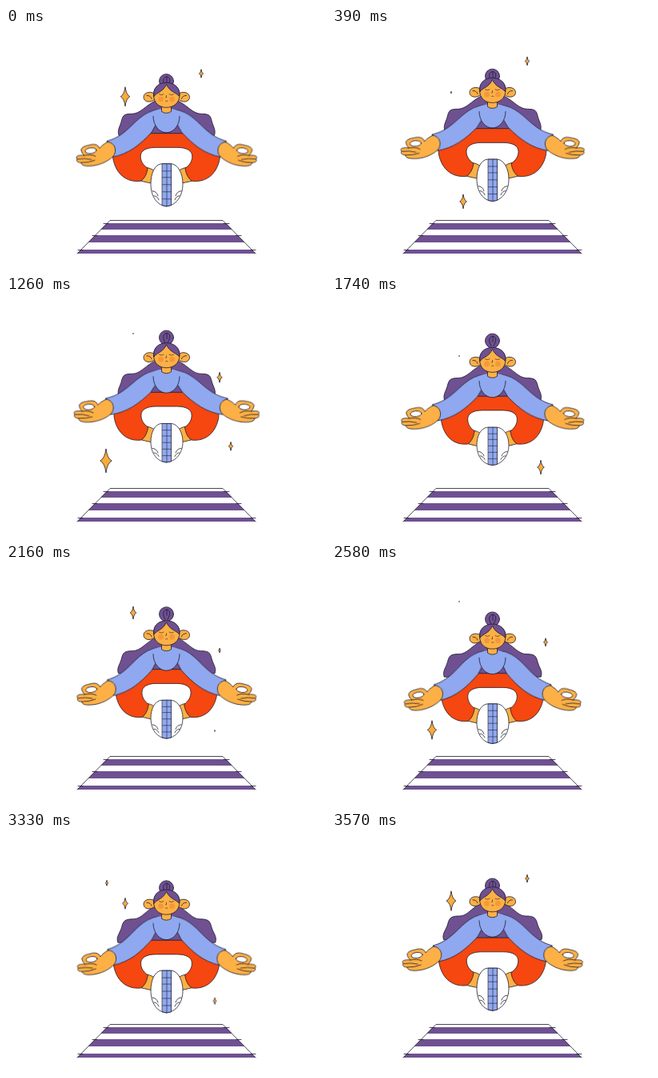
Recreate the animation shown at these times as an HTML page without scripts. Size 400 by 300 pixels, loop 3600 ms.

```html
<!DOCTYPE html>
<html lang="en">
<head>
<meta charset="utf-8">
<title>Floating meditation</title>
<style>
  html, body { margin: 0; width: 100%; height: 100%; overflow: hidden; background: #fff; }
  svg { display: block; width: 100vw; height: 100vh; }

  .ink { stroke: #1d1a2b; stroke-width: .8; stroke-linejoin: round; stroke-linecap: round; }
  .line { fill: none; }
  .fine { stroke-width: .6; }
  .purple { fill: #6f5192; }
  .blue { fill: #8fa8ef; }
  .red { fill: #f5470f; }
  .skin { fill: #fcb045; }
  .white { fill: #fff; }
  .cheek { fill: #f4983a; stroke: none; }

  /* Each part swings like a sine wave; --peak is when it is at its "from" pose. */
  .swing {
    animation: var(--move) 1.8s cubic-bezier(.364, 0, .636, 1) infinite alternate;
    animation-delay: calc((var(--peak) - 3600) * 1ms);
  }
  .upper { --move: bob; --peak: 1000; --high: -10.2px; --low: 7.8px; }
  .legs  { --move: bob; --peak: 1080; --high: -11.4px; --low: 6.6px; }
  .feet  { --move: bob; --peak: 1230; --high: -15.2px; --low: 4.2px; }
  .bun   { --move: bob; --peak: 1200; --high: -14.5px; --low: 4.9px; }
  .arm   { --move: lift; --peak: 1000; transform-origin: 186px 112px; }
  .knees { --move: narrow; --peak: 400; transform-origin: 200.7px 160px; }
  .shoe  { --move: squash; --peak: 0; transform-origin: 200.7px 223px; }

  @keyframes bob    { from { translate: 0 var(--high); } to { translate: 0 var(--low); } }
  @keyframes lift   { from { transform: rotate(3.9deg); } to { transform: rotate(-2.8deg); } }
  @keyframes narrow { from { scale: 1 1; } to { scale: .94 1; } }
  @keyframes squash { from { scale: 1 1; } to { scale: 1 .89; } }

  .hair { animation: flow 1.8s ease-in-out infinite; }
  @keyframes flow {
    0%, 100% { d: path("M201 80L186 91C174 97 168 107 157 107C147 107 146 109 144 117C142 124 139 127 141 134L201 134Z"); }
    43% { d: path("M201 80L186 88C176 91 170 103 161 103C150 103 147 105 145 113C143 121 136 126 139 134L201 134Z"); }
    70% { d: path("M201 80L186 89C180 95 176 95 168 96C158 98 159 107 155 113C152 118 146 116 140 117C134 118 134 126 139 134L201 134Z"); }
  }

  .star {
    fill: #fbab3c; stroke: #1d1a2b; stroke-width: .8;
    animation: twinkle 3.6s linear infinite;
    animation-delay: calc((var(--start) - 3600) * 1ms);
  }
  @keyframes twinkle {
    0% { translate: var(--x) calc(var(--y) + var(--rise)); scale: 0; }
    6.25% { translate: var(--x) calc(var(--y) + var(--rise) / 2); scale: calc(var(--size) * .62); }
    12.5% { translate: var(--x) var(--y); scale: var(--size); }
    18.75% { translate: var(--x) calc(var(--y) - var(--rise) / 2); scale: calc(var(--size) * .62); }
    25%, 100% { translate: var(--x) calc(var(--y) - var(--rise)); scale: 0; }
  }
</style>
</head>
<body>
<svg viewBox="0 0 400 300">
  <defs>
    <path id="star" d="M0 -.5Q.05 -.1 .24 0Q.05 .1 0 .5Q-.05 .1 -.24 0Q-.05 -.1 0 -.5Z" vector-effect="non-scaling-stroke"/>
    <clipPath id="mat"><path d="M130 240H271L312 282H89Z"/></clipPath>

    <path id="hair" class="hair ink purple" d="M201 80L186 91C174 97 168 107 157 107C147 107 146 109 144 117C142 124 139 127 141 134L201 134Z"/>

    <g id="arm" class="ink">
      <path class="blue" d="M190 102C172 103 160 120 150 128C142 135 134 139 126 141L133 161C154 157 168 145 182 130L187 121"/>
      <path class="skin" d="M127 142C122 145 119 147 117 150C115 145 110 144 104 146C97 147 93 150 94 153Q95 157 98 159C90 158 86 160 89 163.500C87 166 90 168 94 168C94 172 100 172.500 107 172C118 171 128 166 134 160C139 154 137 143 127 142Z"/>
      <ellipse class="white" cx="106" cy="153" rx="7" ry="3.500" transform="rotate(-6 106 153)"/>
      <path class="line" d="M98 159Q106 157 112 160M89 163.500Q99 162 107 164M94 168Q104 168 111 165"/>
    </g>

    <g id="ear" class="ink">
      <path class="skin" d="M186 82C181 78 172 80 172 86C172 92 180 94 186 89Z"/>
      <path class="line" d="M176 84Q181 84 182 88"/>
    </g>
  </defs>

  <g class="ink">
    <path class="purple" clip-path="url(#mat)" stroke="none" d="M80 244H320V252H80ZM80 259H320V268H80ZM80 277H320V282H80Z"/>
    <path class="line" d="M89 282L130 240.500H271L312 282"/>
    <path class="line" d="M122 244.500H128M272 244.500H279M108 259.500H114M288 259.500H294M90 277.500H96M306 277.500H312"/>
  </g>

  <g class="swing upper">
    <use href="#hair"/>
    <use href="#hair" transform="matrix(-1 0 0 1 401.500 0)"/>
  </g>

  <g class="swing legs">
    <g class="swing knees ink">
      <path class="skin" d="M174 174C180 174 186 178 190 182L187 194C180 194 174 192 169 191ZM227 174C221 174 215 178 211 182L214 194C221 194 227 192 232 191Z"/>
      <path class="red" d="M150 131.500C136 140 131 156 134 166C138 182 150 193 168 191Q175 187 177 175C171 171 168 166 168 160C168 153 175 149 187 149H214C226 149 233 153 233 160C233 166 230 171 224 175Q226 187 233 191C251 193 263 182 267 166C270 156 265 140 251 131.500Z"/>
    </g>
  </g>

  <g class="swing feet">
    <g class="swing shoe ink">
      <path class="white" d="M200.500 223C189 222.500 181 211 181 195C181 182 186 171 194 170H207C215 171 221 182 221 195C221 211 212 222.500 200.500 223Z"/>
      <path class="blue" d="M195.500 170H206.500V222L200.500 223L195.500 222Z"/>
      <path class="line fine" d="M201 170V223M195.500 179H206.500M195.500 187H206.500M195.500 196H206.500M195.500 205H206.500M195.500 214H206.500"/>
      <path class="line" d="M183 204Q188 204 190 210M185 210Q189 210 191 215M219 204Q214 204 212 210M217 210Q213 210 211 215"/>
    </g>
  </g>

  <g class="swing upper">
    <g class="swing arm"><use href="#arm"/></g>
    <g transform="matrix(-1 0 0 1 401.500 0)">
      <g class="swing arm"><use href="#arm"/></g>
    </g>
    <path class="blue" d="M182 105Q189 101 195 101H206Q212 101 219 105L217 112C217 122 209 130.500 200.500 130.500C192 130.500 184 122 184 112Z"/>
    <path class="ink line" d="M184 110C184 122 192 130.500 200.500 130.500C209 130.500 217 122 217 110"/>
    <path class="ink skin" d="M194.500 94V104Q200.500 108 206.500 104V94Z"/>
  </g>

  <g class="swing bun ink">
    <circle class="purple" cx="200.500" cy="66.500" r="9"/>
    <path class="line" d="M199 73C194 65 198 60 202 61C207 63 204 69 202 73M201 61V68"/>
  </g>

  <g class="swing upper ink">
    <use href="#ear"/>
    <use href="#ear" transform="matrix(-1 0 0 1 401.500 0)"/>
    <path class="skin" d="M184.500 83C184.500 74 191 69 200.500 69S217 74 217 83C217 94 209 99 200.500 99S184.500 94 184.500 83Z"/>
    <path class="purple" d="M185 85C183 75 190 68 200.500 68S218.500 75 216.500 85C212 80 204 79 200.500 70C197 79 189 80 185 85Z"/>
    <circle class="cheek" cx="193.500" cy="88.500" r="3.400"/>
    <circle class="cheek" cx="207.500" cy="88.500" r="3.400"/>
    <path class="line fine" d="M191.500 82.500Q194 84.500 197 82.500M204 82.500Q207 84.500 209.500 82.500M200.500 84V86.500H199.500M199.500 91Q200.500 90 202 91"/>
  </g>

  <g>
    <use href="#star" class="star" style="--x:149px;--y:86px;--size:25;--rise:6px;--start:3130"/>
    <use href="#star" class="star" style="--x:244px;--y:49px;--size:16;--rise:18px;--start:3350"/>
    <use href="#star" class="star" style="--x:164px;--y:215px;--size:20;--rise:14px;--start:0"/>
    <use href="#star" class="star" style="--x:159px;--y:61px;--size:16;--rise:15px;--start:390"/>
    <use href="#star" class="star" style="--x:159px;--y:61px;--size:16;--rise:15px;--start:1710"/>
    <use href="#star" class="star" style="--x:281px;--y:194px;--size:18;--rise:12px;--start:580"/>
    <use href="#star" class="star" style="--x:125px;--y:206px;--size:30;--rise:5px;--start:810"/>
    <use href="#star" class="star" style="--x:125px;--y:206px;--size:30;--rise:5px;--start:2260"/>
    <use href="#star" class="star" style="--x:267px;--y:102px;--size:13;--rise:11px;--start:800"/>
    <use href="#star" class="star" style="--x:267px;--y:101px;--size:13;--rise:11px;--start:2000"/>
    <use href="#star" class="star" style="--x:261px;--y:214px;--size:18;--rise:6px;--start:1300"/>
    <use href="#star" class="star" style="--x:261px;--y:215px;--size:18;--rise:6px;--start:2600"/>
    <use href="#star" class="star" style="--x:126px;--y:71px;--size:14;--rise:12px;--start:2610"/>
  </g>
</svg>
</body>
</html>
```
